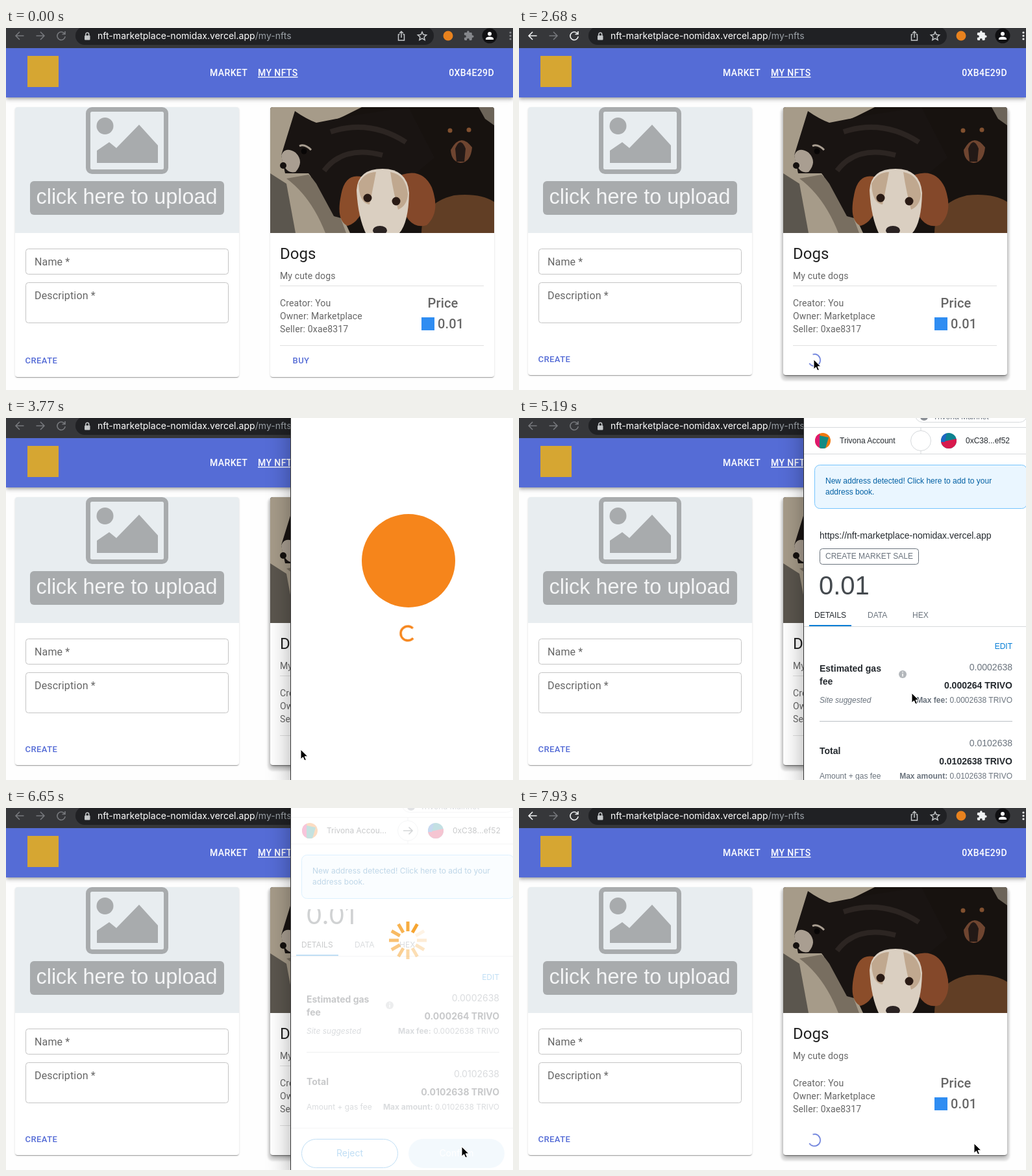
Animation, 781 px wide and 558 px high, one loop 7.99 s. Source, as an HTML page:

```html
<!DOCTYPE html>
<html lang="en">
<head>
<meta charset="utf-8">
<title>NFT marketplace</title>
<style>
html, body { margin: 0; width: 100%; height: 100%; overflow: hidden; }
#stage { position: relative; width: 781px; height: 558px; overflow: hidden; background: #fefefe; --lift: 0; }
#stage > *, #popup > * { position: absolute; }
svg { display: block; left: 0; top: 0; overflow: hidden; }
text { font-family: Roboto, sans-serif; white-space: pre; }

.bar { left: 0; top: 30px; width: 781px; height: 77px; background: #556cd6;
  box-shadow: 0 2px 4px -1px #0003, 0 4px 5px #00000024, 0 1px 10px #0000001f; }
.card { top: 122px; width: 345px; height: 416px; border-radius: 4px; background: #fff;
  box-shadow: 0 2px 1px -1px #0003, 0 1px 1px #00000024, 0 1px 3px #0000001f; }
.card.lifted::after { content: ""; position: absolute; inset: 0; border-radius: 4px; opacity: var(--lift);
  box-shadow: 0 5px 5px -3px #0003, 0 4px 6px #00000024, 0 5px 3px 4px #0000001c; }
.busy .card { height: 413px; }

/* browser toolbar */
.url { font: 14px Inter, sans-serif; letter-spacing: .03px; }
.line { fill: none; stroke: #c4c7c9; stroke-width: 1.5; }
.focus { stroke: #77797d; fill: none; stroke-width: 1.6; }
.ext { fill: #85878b; }
.active .focus { stroke: #f1f3f4; }
.active .ext { fill: #f1f3f4; }

/* page */
.nav { font-size: 14px; font-weight: 500; letter-spacing: .4px; fill: #fff; }
.btn { font-size: 13px; font-weight: 500; letter-spacing: .46px; fill: #556cd6; }
.label { font-size: 16px; letter-spacing: .15px; fill: #666; }
.body { font-size: 14px; letter-spacing: .15px; fill: #666; }
.h6 { font-size: 20px; font-weight: 500; letter-spacing: .15px; fill: #666; }
.field { fill: none; stroke: #c4c4c4; }
.rule { stroke: #e0e0e0; }
.busy .create { transform: translateY(-2px); }
.busy .buy, #stage:not(.busy) .spinner, .closed .rule { visibility: hidden; }

.turn { animation: turn 1.4s linear infinite paused; animation-delay: calc(var(--t) * -1ms); }
.dash { fill: none; stroke: #556cd6; stroke-width: 1.65;
  animation: dash 1.4s ease-in-out infinite paused; animation-delay: calc(var(--t) * -1ms); }
#loader { animation-duration: 1s; }
@keyframes turn { from { transform: rotate(-90deg); } to { transform: rotate(270deg); } }
@keyframes dash {
  0% { stroke-dasharray: .45 91; stroke-dashoffset: 0; }
  50% { stroke-dasharray: 45.5 91; stroke-dashoffset: -6.8; }
  100% { stroke-dasharray: 45.5 91; stroke-dashoffset: -56.8; }
}

/* wallet popup */
#popup { left: 439px; top: -46px; width: 358px; height: 617px; border-radius: 10px; overflow: hidden;
  background: #fff; box-shadow: 0 0 0 1px #333, 0 8px 36px #00000059; }
#popup.dark { background: #161616; }
.dark .loading, .dark .wallet { visibility: hidden; }
.wallet text { font: 12px "Liberation Sans", Arial, sans-serif; fill: #24292e; }
.wallet.loaded text { font-family: Inter, sans-serif; }
.wallet .md { font-size: 14px; }
.wallet .bold { font-weight: 700; }
.wallet .grey { fill: #6a737d; }
.wallet .blue { fill: #037dd6; }
.wallet .note { fill: #0260a4; }
.wallet .white { fill: #fff; }
.wallet .slant { font-style: italic; }
.wallet .big { font-size: 40px; fill: #454a4f; }
.end { text-anchor: end; }
.mid { text-anchor: middle; }
.edge { fill: none; stroke: #d6d9dc; }
.loaded .top { transform: translateY(-2px); }
.wallet:not(.loaded) .arrow, .wallet:not(.loaded) .short, .wallet.loaded .long { visibility: hidden; }
</style>
</head>
<body>
<div id="stage">
  <div class="bar"></div>
  <div class="card" style="left:14px"></div>
  <div class="card lifted" style="left:407px"></div>

  <svg width="781" height="558">
    <defs>
      <clipPath id="photo"><path d="M407 316V126a4 4 0 0 1 4-4H748a4 4 0 0 1 4 4V316Z"/></clipPath>
      <clipPath id="from"><circle cx="468" cy="35" r="12"/></clipPath>
      <clipPath id="to"><circle cx="662" cy="35" r="12"/></clipPath>
      <clipPath id="view"><rect x="439" y="156" width="358" height="415"/></clipPath>
    </defs>

    <rect width="781" height="31" fill="#36373a"/>
    <rect x="107" y="-2" width="552" height="28" rx="14" fill="#202124"/>
    <path class="focus" d="M27.500 12H15M21 6l-6 6 6 6"/>
    <path class="line" style="stroke:#77797d" d="M46.500 12H59M53 6l6 6-6 6"/>
    <path class="focus" d="M90 8.500A6.200 6.200 0 1 0 91.200 13M91 5v4.500h-4.500"/>
    <rect x="121" y="11.500" width="8.500" height="7" rx="1" fill="#c4c7c9"/>
    <path class="line" d="M122.800 12V9.800a2.400 2.400 0 0 1 4.900 0V12"/>
    <text class="url" x="141" y="17" fill="#fff">nft-marketplace-nomidax.vercel.app<tspan fill="#9aa0a6">/my-nfts</tspan></text>
    <path class="line" d="M606.500 10H604.500V19H613.500V10H611.500M609 15V5.500M606 8.300l3-3 3 3"/>
    <path class="line" d="M641 6l1.900 4.300 4.700.5-3.500 3.100 1 4.600-4.100-2.400-4.100 2.400 1-4.600-3.500-3.100 4.700-.5z"/>
    <circle cx="681" cy="12" r="7.500" fill="#e8821e"/>
    <g id="badge"><rect x="683" y="14" width="12" height="12" rx="2" fill="#0b7fdc"/><text x="689" y="23.500" font-size="9" fill="#fff" class="mid">1</text></g>
    <path class="ext" transform="translate(704.500 3.500) scale(.7)" d="M20.500 11H19V7c0-1.100-.9-2-2-2h-4V3.500a2.500 2.500 0 0 0-5 0V5H4c-1.100 0-2 .9-2 2v3.800h1.500a2.700 2.700 0 0 1 0 5.400H2V20c0 1.100.9 2 2 2h3.800v-1.500a2.700 2.700 0 0 1 5.400 0V22H17c1.100 0 2-.9 2-2v-4h1.500a2.500 2.500 0 0 0 0-5z"/>
    <circle cx="745" cy="12" r="11.500" fill="#101012"/>
    <circle cx="745" cy="9" r="3" fill="#fff"/>
    <path d="M739 18v-1.500c0-4 12-4 12 0V18Z" fill="#fff"/>
    <g class="ext"><circle cx="777" cy="7" r="1.600"/><circle cx="777" cy="12" r="1.600"/><circle cx="777" cy="17" r="1.600"/></g>

    <rect x="33" y="43" width="48" height="48" fill="#d6a632"/>
    <text class="nav" x="314" y="74">MARKET</text>
    <text class="nav" x="388" y="74" text-decoration="underline">MY NFTS</text>
    <text class="nav end" x="752" y="74">0XB4E29D</text>

    <path d="M14 316V126a4 4 0 0 1 4-4H355a4 4 0 0 1 4 4V316Z" fill="#e8edf0"/>
    <g fill="#a8abad">
      <rect x="126.500" y="125.500" width="120" height="96" rx="6" fill="none" stroke="#a8abad" stroke-width="7"/>
      <circle cx="152.500" cy="151" r="13"/>
      <path d="M140 208V189L159 176 170 185 205 149 234 181V208Z"/>
      <rect x="37" y="236" width="299" height="52" rx="6"/>
    </g>
    <text x="46.500" y="271" fill="#f4f5f6" style="font:32.400px 'Liberation Sans',Arial,sans-serif">click here to upload</text>
    <rect class="field" x="30.500" y="340.500" width="312" height="39" rx="4"/>
    <rect class="field" x="30.500" y="392.500" width="312" height="62" rx="4"/>
    <text class="label" x="44" y="366">Name *</text>
    <text class="label" x="44" y="418">Description *</text>
    <text class="btn create" x="29.500" y="517">CREATE</text>

    <g clip-path="url(#photo)">
      <rect x="407" y="122" width="345" height="194" fill="#17120f"/>
      <path d="M407 122H548L520 136 488 150 470 230 505 262 530 316H407Z" fill="#a69b89"/>
      <path d="M407 224L432 240 446 316H407Z" fill="#5b564e"/>
      <path d="M432 232L466 226 504 262 524 316H492Q470 260 432 232Z" fill="#786e60"/>
      <path d="M445 128Q462 140 478 146L540 134 620 122 660 200 540 300 505 290 478 240 466 224 430 224 424 196Z" fill="#191412"/>
      <path d="M424 196Q430 182 446 192Q460 206 446 222Q428 226 424 196Z" fill="#a99e91"/>
      <path d="M452 182Q460 178 470 188" fill="none" stroke="#a99e91" stroke-width="3"/>
      <circle cx="459" cy="190" r="4.500" fill="#080606"/>
      <circle cx="427" cy="212" r="5" fill="#15110f"/>
      <path d="M500 160Q560 140 616 176M490 220Q520 180 580 196" fill="none" stroke="#2c2522" stroke-width="8"/>
      <path d="M728 122H752V150L738 140Z" fill="#6c6459"/>
      <path d="M685 188Q700 160 718 184Q716 207 700 208Q686 206 685 188Z" fill="#6f4530"/>
      <path d="M692 186Q700 166 708 186L706 206H694Z" fill="#231916"/>
      <circle cx="684" cy="158" r="3.500" fill="#81502f"/><circle cx="713" cy="157" r="3.500" fill="#81502f"/>
      <path d="M640 316Q640 270 690 258Q730 254 752 268V316Z" fill="#613e25"/>
      <path d="M550 230Q522 222 516 258Q508 296 526 305Q546 300 556 262Z" fill="#8b4d2a"/>
      <path d="M610 226Q642 216 656 246Q670 284 648 304Q620 312 608 270Z" fill="#84482a"/>
      <path d="M540 250Q542 217 580 217Q618 217 621 254Q620 300 606 316H554Q542 290 540 250Z" fill="#dacfc1"/>
      <path d="M543 240Q552 222 570 222Q566 244 560 272Q544 270 543 240ZM592 222Q616 226 619 256Q618 274 604 280Q596 250 592 222Z" fill="#c0a88f"/>
      <circle cx="557" cy="262" r="6.500" fill="#2a1b15"/><circle cx="601" cy="267" r="6.500" fill="#2a1b15"/>
      <ellipse cx="576" cy="312" rx="11" ry="7" fill="#2b2322"/>
    </g>
    <text x="422" y="356" font-size="24" fill="#212121">Dogs</text>
    <text class="body" x="422" y="387">My cute dogs</text>
    <path class="rule" d="M422 397.500H736M422 489.500H736"/>
    <text class="body" x="422" y="429">Creator: You</text>
    <text class="body" x="422" y="449">Owner: Marketplace</text>
    <text class="body" x="422" y="469">Seller: 0xae8317</text>
    <text class="h6 mid" x="673" y="431">Price</text>
    <rect x="640" y="446" width="20" height="20" fill="#2f8df2"/>
    <text class="h6" x="665" y="463">0.01</text>
    <text class="btn buy" x="441.500" y="517">BUY</text>
    <g class="spinner" transform="translate(455 512)"><g class="turn" id="spin"><circle class="dash" r="9.200"/></g></g>
  </svg>

  <div id="popup">
    <svg width="358" height="617" viewBox="439 -46 358 617">
      <rect x="439" y="-46" width="358" height="28" fill="#333436"/>
      <circle cx="454" cy="-31" r="6" fill="#fe5f57"/><circle cx="474" cy="-31" r="6" fill="#febc2e"/><circle cx="494" cy="-31" r="6" fill="#28c840"/>

      <g class="loading" id="loading">
        <circle cx="620" cy="220" r="72" fill="#f6851b"/>
        <g transform="translate(619 332)"><g class="turn" id="loader"><circle r="11" fill="none" stroke="#f6851b" stroke-width="3.500" stroke-dasharray="52 17.100"/></g></g>
      </g>

      <g class="wallet" id="wallet">
        <rect class="edge" x="610.500" y="-16" width="172" height="22.500" rx="11"/>
        <circle cx="624" cy="-2" r="6" fill="#8b9096"/>
        <text class="grey" x="638" y="2">Trivona Mainnet</text>
        <path class="edge" d="M439 14.500H797M439 55.500H797M619 14V55"/>
        <circle class="edge" cx="619" cy="35" r="15.500" style="fill:#fff"/>
        <path class="arrow" d="M612 35H626M620.500 29.500L626 35 620.500 40.500" fill="none" stroke="#535a61" stroke-width="1.600"/>
        <g clip-path="url(#from)"><path d="M456 23h24v24h-24z" fill="#f2790f"/><path d="M456 23h7l4 24h-11z" fill="#e0186f"/><path d="M463 27l14 3-5 17h-9z" fill="#148a83"/></g>
        <g clip-path="url(#to)"><path d="M650 23h24v24h-24z" fill="#0e8390"/><path d="M650 37l24-5v15h-24z" fill="#d8194d"/><path d="M650 23h9l-3 14h-6z" fill="#1f66c4"/></g>
        <text class="long" x="494" y="39">Trivona Account</text>
        <text class="short" x="494" y="39">Trivona Accou...</text>
        <text x="688" y="39">0xC38...ef52</text>
        <rect x="455.500" y="72.500" width="327" height="67" rx="8" fill="#eaf6ff" stroke="#75c4fd"/>
        <text class="note" x="472" y="101">New address detected! Click here to add to your</text>
        <text class="note" x="472" y="118">address book.</text>

        <g clip-path="url(#view)"><g id="scroll">
          <g class="top">
            <text class="md" x="463" y="186">https://nft-marketplace-nomidax.vercel.app</text>
            <rect x="463.500" y="201.500" width="152" height="24" rx="4" fill="none" stroke="#6a737d"/>
            <text class="grey" x="472" y="217">CREATE MARKET SALE</text>
            <text class="big" x="462" y="272">0.01</text>
            <text x="455" y="308">DETAILS</text>
            <text class="grey" x="537" y="308">DATA</text>
            <text class="grey" x="606" y="308">HEX</text>
            <path class="edge" d="M439 321.500H797"/>
            <rect x="447" y="319" width="65" height="2" fill="#037dd6"/>
          </g>
          <text class="blue end" x="760" y="356">EDIT</text>
          <text class="md bold" x="463" y="391">Estimated gas</text>
          <text class="md bold" x="463" y="411">fee</text>
          <circle cx="591" cy="395" r="6" fill="#b3b7bb"/>
          <path d="M591 391v1.500M591 394v4.500" stroke="#fff" stroke-width="1.500"/>
          <text class="md grey end" x="760" y="389">0.0002638</text>
          <text class="md bold end" x="760" y="417">0.000264 TRIVO</text>
          <text class="grey slant" x="463" y="439">Site suggested</text>
          <text class="grey end" x="760" y="439"><tspan class="bold">Max fee:</tspan> 0.0002638 TRIVO</text>
          <path d="M463 467.500H760" stroke="#bbc0c5"/>
          <text class="md bold" x="463" y="518">Total</text>
          <text class="md grey end" x="760" y="506">0.0102638</text>
          <text class="md bold end" x="760" y="534">0.0102638 TRIVO</text>
          <text class="grey" x="463" y="556">Amount + gas fee</text>
          <text class="grey end" x="760" y="556"><tspan class="bold">Max amount:</tspan> 0.0102638 TRIVO</text>
          <path class="edge" d="M439 584.500H797"/>
          <rect x="455.500" y="601.500" width="148" height="44" rx="22" fill="#fff" stroke="#037dd6"/>
          <text class="md blue mid" x="529.500" y="628">Reject</text>
          <rect id="confirm" x="620" y="601" width="148" height="45" rx="22.500" fill="#037dd6"/>
          <text class="md white mid" x="694" y="628">Confirm</text>
        </g></g>
        <g id="wait">
          <rect x="439" y="-18" width="358" height="590" fill="#fff" opacity=".75"/>
          <g id="spokes" transform="translate(619 204)" stroke="#f7a531" stroke-width="5"></g>
        </g>
      </g>
    </svg>
  </div>

  <svg width="781" height="558">
    <g id="cursor">
      <path id="arrow" d="M0 0V15l3.500-3.200 2.300 5.200 2.600-1.100-2.300-5.100H11Z" stroke="#fff"/>
      <path id="hand" fill="#fff" stroke="#000" d="M-1.500 1.200a1.400 1.400 0 0 1 2.800 0V7c.3-1.200 2.400-1 2.600.3.5-1 2.300-.7 2.400.6.600-.8 2-.4 2 .9v4c0 2-1.300 3-1.300 5.200H-.5C-.6 16-5 12.500-5.600 10.500c-.5-1.600 1.300-2 2.200-1l1.900 2Z"/>
    </g>
  </svg>
</div>

<script>
const LOOP = 7990;
const $ = id => document.getElementById(id);
const ramp = (t, a, b) => Math.min(1, Math.max(0, (t - a) / (b - a)));
const ease = p => p * p * (3 - 2 * p);
const within = (t, a, b) => t >= a && t < b;
const show = (id, on) => { $(id).style.display = on ? "" : "none"; };

// time, x, y of the pointer tip
const route = [[1000, 470, 562], [1400, 454, 511], [4450, 454, 511], [4880, 605, 424],
  [6050, 605, 424], [6400, 702, 522], [7000, 702, 522], [7300, 701, 517]];

function pointer(t) {
  let [, x, y] = route[0];
  for (let i = 1; i < route.length; i++) {
    const [a, x0, y0] = route[i - 1], [b, x1, y1] = route[i];
    if (t < a) break;
    const p = ease(ramp(t, a, b));
    x = x0 + (x1 - x0) * p;
    y = y0 + (y1 - y0) * p;
  }
  return [x, y];
}

$("spokes").innerHTML = Array.from({ length: 12 }, (_, i) =>
  `<path d="M0-14V-29" transform="rotate(${30 - 30 * i})" opacity="${1 - i * .08}"/>`).join("");

function pose(t) {
  const stage = $("stage"), popup = $("popup");
  stage.classList.toggle("active", within(t, 360, 3600) || t >= 6980);
  stage.classList.toggle("busy", t >= 1760);
  stage.classList.toggle("closed", t >= 6880);
  stage.style.setProperty("--lift", ease(ramp(t, 1180, 1480)));
  $("spin").style.setProperty("--t", Math.max(0, t - (t < 4000 ? 1760 : 1410)));
  show("badge", within(t, 3500, 6880));

  const opening = ramp(t, 3590, 3770), closing = ramp(t, 6880, 7050);
  show("popup", opening > 0 && closing < 1);
  popup.classList.toggle("dark", opening < 1);
  popup.style.transform = `scale(${(.2 + .8 * opening) * (1 - .1 * closing)})`;
  popup.style.opacity = Math.min(1, opening * 1.2) * (1 - closing);

  show("loading", t < 4970);
  show("wallet", t >= 4970);
  $("loader").style.setProperty("--t", Math.max(0, t - 3403));
  $("wallet").classList.toggle("loaded", t >= 5400);
  $("scroll").setAttribute("transform", `translate(0 ${-91 * ease(ramp(t, 5740, 6150))})`);
  show("wait", t >= 6650);
  $("confirm").setAttribute("opacity", t >= 6650 ? .18 : 1);

  const onBuy = within(t, 1290, 1800);
  show("cursor", t >= 1000);
  show("hand", onBuy);
  show("arrow", !onBuy);
  $("cursor").setAttribute("transform", `translate(${pointer(t)})`);
}

function frame() {
  pose(performance.now() % LOOP);
  requestAnimationFrame(frame);
}
frame();
</script>
</body>
</html>
```
